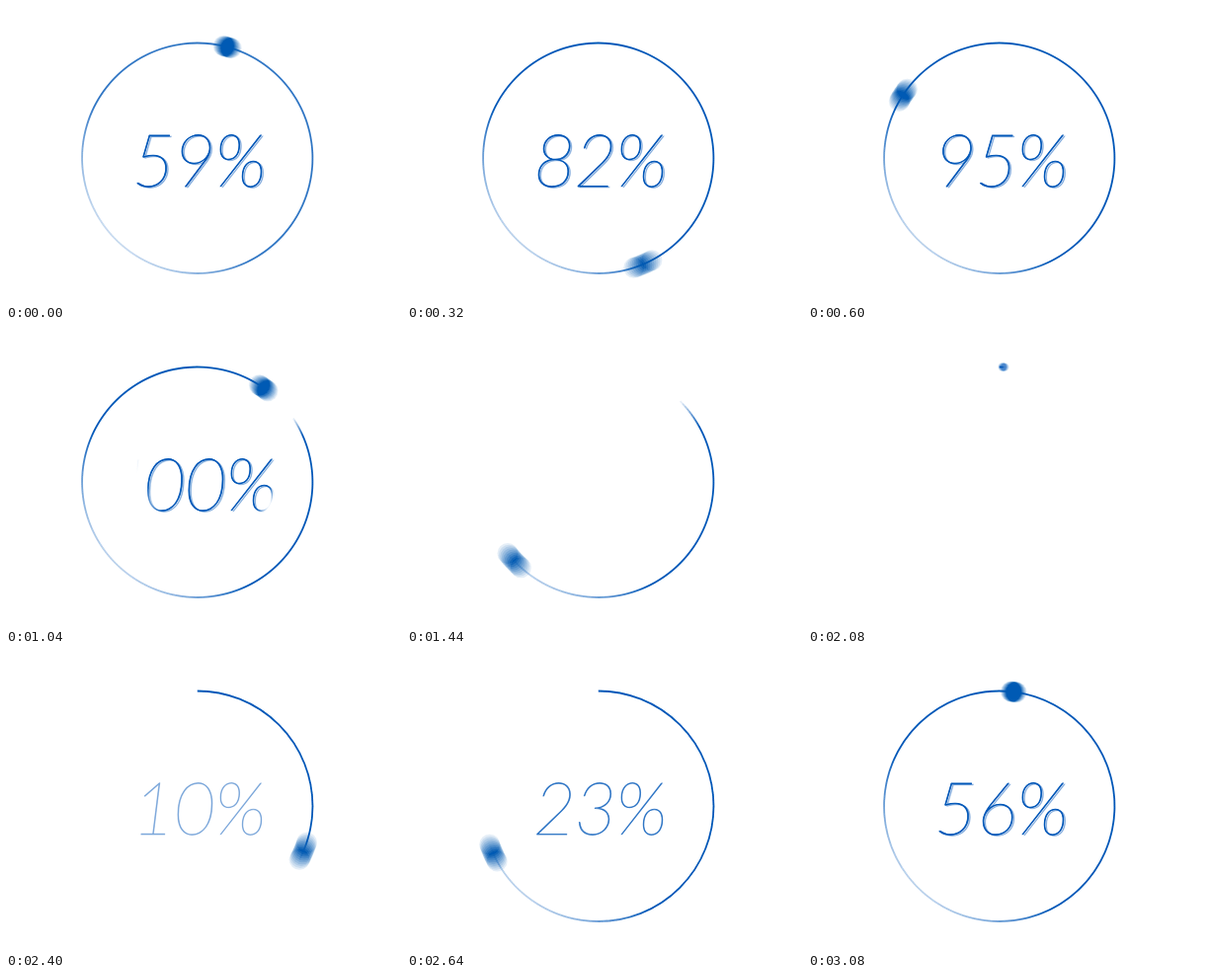
These frames come from a looping animation (400 px wide and 300 px high, 3120 ms). An HTML page with a canvas:

```html
<!DOCTYPE html>
<html lang="en">
<head>
<meta charset="utf-8">
<title>Progress ring</title>
<style>
html, body { margin: 0; width: 100%; height: 100%; overflow: hidden; background: #fff; }
canvas { position: absolute; left: 0; top: 0; width: 400px; height: 300px; }
</style>
</head>
<body>
<canvas id="ring" width="400" height="300"></canvas>
<canvas id="dot" width="400" height="300"></canvas>
<script>
const layer = id => document.getElementById(id).getContext('2d');
const g = layer('ring'), dot = layer('dot');
const LOOP = 3120, STEP = 40, START = 2034, LAP = 960;
const CX = 193.75, CY = 154.25, R = 116.75, BLUE = '#0057b8';
const SHUTTER = 19, SAMPLES = 10;

const clamp = v => Math.max(0, Math.min(1, v));
const sine = p => (1 - Math.cos(Math.PI * p)) / 2;
const rad = deg => (deg - 90) * Math.PI / 180;

// Keys of the closing lap: time, degrees, degrees per ms
const HEAD = [[3954, 0, 0], [4160, 35, .3], [4560, 227, .56], [4800, 344, .25], [5080, 360, 0]];
const TAIL = [[3954, -360, 0], [4160, -299, .55], [4560, 53, .9], [4800, 260, .7], [5080, 360, 0]];

function hermite(keys, t) {
  if (t >= keys[keys.length - 1][0]) return 360;
  let i = 0;
  while (t >= keys[i + 1][0]) i++;
  const [t0, a, va] = keys[i], [t1, b, vb] = keys[i + 1];
  const d = t1 - t0, u = (t - t0) / d, w = 1 - u;
  return a * w * w * (1 + 2 * u) + b * u * u * (3 - 2 * u) + d * u * w * (va * w - vb * u);
}

// Start and end of the line in degrees, clockwise from the top
function pose(t) {
  const laps = Math.max(0, (t - START) / LAP);
  if (laps >= 2) return [hermite(TAIL, t), hermite(HEAD, t)];
  const p = laps % 1;
  const head = 360 * sine(p - .2 * p ** 4 * (1 - p));
  return [laps < 1 ? 0 : head - 360, head];
}

const ink = g.createLinearGradient(109, 239, 167, 181);
ink.addColorStop(0, 'rgba(0,87,184,.24)');
ink.addColorStop(.5, 'rgba(0,87,184,.6)');
ink.addColorStop(1, BLUE);

// Averages several moments for motion blur
function drawRing(t) {
  const size = Math.min(clamp((t - 2040) / 100), clamp((5120 - t) / 160));
  if (!size) return;
  g.save();
  g.globalCompositeOperation = dot.globalCompositeOperation = 'lighter';
  g.lineWidth = 1.8;
  g.strokeStyle = ink;
  g.globalAlpha = 1 / SAMPLES;
  dot.globalAlpha = Math.min(1, size * 1.8) / SAMPLES;
  dot.fillStyle = BLUE;
  for (let i = 0; i < SAMPLES; i++) {
    const [from, to] = pose(t + SHUTTER * ((i + .5) / SAMPLES - .5));
    if (to > from) {
      g.beginPath();
      g.arc(CX, CY, R, rad(from), rad(to));
      g.stroke();
    }
    dot.beginPath();
    dot.arc(CX + R * Math.cos(rad(to)), CY + R * Math.sin(rad(to)), 10.5 * size, 0, 7);
    dot.fill();
  }
  g.restore();
}

function drawLabel(t) {
  const fade = clamp((t - 2120) / 800);
  const wipe = clamp((t - 3960) / 400);
  if (!fade || wipe === 1) return;
  const digits = String(Math.round(100 * sine(clamp((t - 2000) / 2000))));
  const shift = [0, -21, 0, 11][digits.length];
  let paint = BLUE;
  if (wipe) {
    const radius = 97 * (1 - wipe * wipe);
    paint = g.createRadialGradient(205, 140, Math.max(0, radius - 10), 205, 140, radius);
    paint.addColorStop(0, BLUE);
    paint.addColorStop(1, 'rgba(0,87,184,0)');
  }
  const write = (offset, alpha) => {
    const put = (text, x) => {
      g.fillText(text, x + shift + offset, 182.5 + offset);
      g.strokeText(text, x + shift + offset, 182.5 + offset);
    };
    g.globalAlpha = alpha;
    put('%', 237.5);
    [...digits].reverse().forEach((c, i) => put(c, [191, 149.5, 115][i]));
  };
  g.save();
  g.font = 'italic 200 75px Lato, sans-serif';
  g.textAlign = 'center';
  g.fillStyle = g.strokeStyle = paint;
  g.lineWidth = .8;
  g.lineJoin = 'round';
  write(1.7, .3 * clamp((t - 2640) / 400));
  write(0, fade);
  g.restore();
}

function frame() {
  let t = Math.floor(performance.now() % LOOP / STEP) * STEP;
  if (t < 2000) t += LOOP;
  g.clearRect(0, 0, 400, 300);
  dot.clearRect(0, 0, 400, 300);
  drawRing(t);
  drawLabel(t);
  requestAnimationFrame(frame);
}
frame();
</script>
</body>
</html>
```
